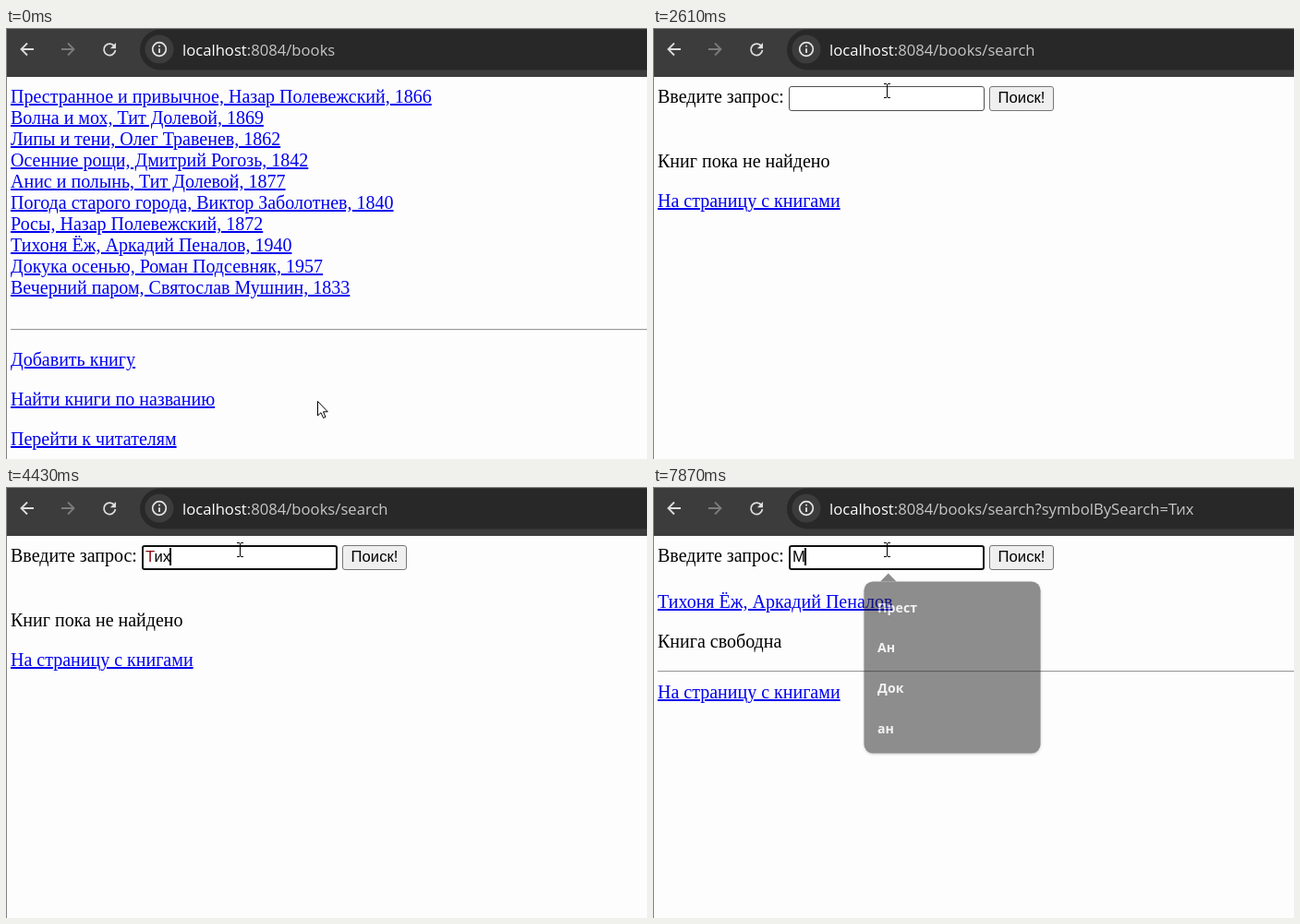
These frames come from a looping animation (694x467 px, 7.99 s). An HTML page:

```html
<!DOCTYPE html>
<html lang="ru">
<head>
<meta charset="utf-8">
<title>Книги</title>
<style>
html, body { margin: 0; width: 100%; height: 100%; overflow: hidden; background: #fdfdfd; }
#stage { position: relative; width: 694px; height: 467px; overflow: hidden; background: #fdfdfd;
  font: 20px/23px "Liberation Serif", "Times New Roman", serif; color: #000; }
#stage div, #stage svg { position: absolute; left: 0; top: 0; white-space: pre; box-sizing: border-box; }
[hidden] { display: none !important; }
#stage .line { left: 5px; }
#stage .link { left: 5px; color: #00e; text-decoration: underline; }
#stage .rule { left: 5px; width: 700px; height: 2px; background: #eee; border-top: 1px solid #9a9a9a; }
#stage #url { left: 191px; top: 12px; font: 16.65px/23px "Open Sans", "Noto Sans", sans-serif; color: #c7c7c7; }
#url b { font-weight: 400; color: #fff; }
.ui { font: 16.67px/25px "Liberation Sans", Arial, sans-serif; }
#stage #field { left: 147px; top: 63px; width: 212px; height: 27px; border: 1px solid #767676; border-radius: 3px; background: #fff; }
#stage #field.hover { border-color: #4f4f4f; }
#stage #field.focus { border: 2px solid #101010; }
#stage #typed { left: 151px; top: 63px; }
#typed.tinted::first-letter { color: #8b0a14; }
#caret { width: 2px; height: 19px; background: #000; }
#stage #button { left: 364px; top: 63px; width: 70px; height: 27px; border: 1px solid #767676; border-radius: 3px;
  background: #efefef; text-align: center; line-height: 24px; }
#stage #popup { left: 226px; top: 100px; width: 196px; height: 191px; border-radius: 10px; background: #1f1f1f;
  box-shadow: 0 1px 3px #0006; font: 700 14.5px/20px "Open Sans", "Noto Sans", sans-serif; color: #e8e8e8; }
#popup::before { content: ""; position: absolute; left: 18px; top: -9px;
  border: 9.5px solid transparent; border-top: 0; border-bottom-color: #1f1f1f; }
#stage #popup div { left: 15px; }
#stage #cursor { overflow: visible; }
</style>
</head>
<body>
<div id="stage">
  <div id="books"></div>
  <div id="search">
    <div class="line" style="top:63px">Введите запрос:</div>
    <div id="field"></div>
    <div id="typed" class="ui"></div>
    <div id="caret"></div>
    <div id="button" class="ui">Поиск!</div>
    <div id="empty"></div>
    <div id="found"></div>
    <div id="popup"></div>
  </div>

  <svg width="694" height="467" fill="none" stroke-width="1.8">
    <path fill="#3c3c3c" d="M0 0H694V53H0Z"/>
    <path fill="#282828" d="M694 1.5H167a22 22 0 0 0 0 44H694Z"/>
    <path stroke="#808080" stroke-width="1" d="M.5 467V.5H694"/>
    <path stroke="#dedede" d="M30 23H16.5M23 16.5 16.5 23 23 29.5"/>
    <path stroke="#7c7c7c" d="M60 23H73.5M67 16.5 73.5 23 67 29.5"/>
    <g id="reload" stroke="#dedede">
      <path d="M117.6 20.2A6.2 6.2 0 1 0 118.4 24"/>
      <path fill="#dedede" stroke="none" d="M119 16V22.2H112.8Z"/>
    </g>
    <path id="stop" stroke="#dedede" d="M107 17.5 118 28.5M118 17.5 107 28.5"/>
    <circle cx="166" cy="23" r="15.5" fill="#3c3c3c"/>
    <circle cx="166" cy="23" r="7.3" stroke="#e6e6e6" stroke-width="1.7"/>
    <path stroke="#e6e6e6" d="M166 22.2V27M166 18.8V20.5"/>
  </svg>
  <div id="url"></div>

  <svg id="cursor" width="1" height="1" fill="#fff" stroke="#000">
    <path id="arrow" d="M.5.5V16L4 12.8 6.6 18.5 9 17.5 6.5 11.8H11.3Z"/>
    <path id="hand" d="M5.5 15.5V2.5a1.5 1.5 0 0 1 3 0V9q2.6-1 3 .8 2.4-.8 2.9 1 2.6-.6 2.6 1.7V17q0 3-2 5v1.5H7.5V22L2 15.5Q.2 13 1.5 12.3t4 3.2Z"/>
    <path id="beam" fill="none" d="M0 .5H3M4 .5H7M3.5 1V15M0 15.5H3M4 15.5H7"/>
  </svg>
</div>

<script>
const $ = id => document.getElementById(id);

function add(parent, top, text, type = "link") {
  const el = document.createElement("div");
  el.className = type;
  el.style.top = top + "px";
  el.textContent = text;
  $(parent).append(el);
  return el;
}

[
  "Престранное и привычное, Назар Полевежский, 1866",
  "Волна и мох, Тит Долевой, 1869",
  "Липы и тени, Олег Травенев, 1862",
  "Осенние рощи, Дмитрий Рогозь, 1842",
  "Анис и полынь, Тит Долевой, 1877",
  "Погода старого города, Виктор Заболотнев, 1840",
  "Росы, Назар Полевежский, 1872",
  "Тихоня Ёж, Аркадий Пеналов, 1940",
  "Докука осенью, Роман Подсевняк, 1957",
  "Вечерний паром, Святослав Мушнин, 1833"
].forEach((book, i) => add("books", 63 + 23 * i, book));
add("books", 326, "", "rule");
add("books", 348, "Добавить книгу");
const searchLink = add("books", 391, "Найти книги по названию");
add("books", 434, "Перейти к читателям");

add("empty", 133, "Книг пока не найдено", "line");
add("empty", 176, "На страницу с книгами");
add("found", 113, "Тихоня Ёж, Аркадий Пеналов");
add("found", 156, "Книга свободна", "line");
add("found", 199, "", "rule");
add("found", 211, "На страницу с книгами");
["Прест", "Ан", "Док", "ан"].forEach((hint, i) => add("popup", 18.5 + 45 * i, hint, "hint"));

// Each entry overrides part of the state from its time on (ms).
const LOOP = 7990;
const timeline = [
  [0, { page: "books", path: "/books", loading: false, pressed: false, field: "", typed: "", caret: 0, popup: 0,
        cursor: "arrow", x: 337, y: 404 }],
  [550, { cursor: "" }],
  [700, { cursor: "arrow", x: 273, y: 412 }],
  [830, { cursor: "hand", x: 215, y: 393 }],
  [980, { x: 209, y: 394 }],
  [1130, { x: 205, y: 397 }],
  [1530, { pressed: true }],
  [1790, { pressed: false, loading: true, cursor: "arrow", x: 211 }],
  [1910, { loading: false, page: "empty", path: "/books/search" }],
  [2340, { x: 213, y: 347 }],
  [2490, { x: 235, y: 190 }],
  [2610, { cursor: "beam", x: 250, y: 60, field: "hover" }],
  [3180, { field: "focus", caret: 151, popup: 1 }],
  [3710, { caret: 0 }],
  [3860, { typed: "Т", caret: 161 }],
  [4000, { popup: .245 }],
  [4150, { popup: 0 }],
  [4430, { typed: "Тих", caret: 177 }],
  [5110, { loading: true, caret: 0 }],
  [5360, { loading: false, page: "found", path: "/books/search?symbolBySearch=Тих", field: "hover", typed: "" }],
  [7010, { field: "focus", caret: 151, popup: 1 }],
  [7440, { caret: 0 }],
  [7730, { typed: "М", caret: 164 }],
  [7870, { popup: .5 }]
];

const show = (id, visible) => $(id).toggleAttribute("hidden", !visible);

function render(time) {
  const s = Object.assign({}, ...timeline.filter(([start]) => start <= time).map(([, change]) => change));

  show("books", s.page === "books");
  show("search", s.page !== "books");
  show("empty", s.page === "empty");
  show("found", s.page === "found");
  show("reload", !s.loading);
  show("stop", s.loading);
  $("url").innerHTML = "<b>localhost</b>:8084" + s.path;
  searchLink.style.color = s.pressed ? "#f00" : "";

  $("field").className = s.field;
  $("typed").textContent = s.typed;
  $("typed").className = s.typed.startsWith("Т") ? "ui tinted" : "ui";
  show("caret", s.caret);
  $("caret").style.left = s.caret + "px";
  $("caret").style.top = (s.typed ? 66 : 67) + "px";

  $("popup").style.opacity = s.popup;
  $("popup").style.transform = `scale(${.95 + .05 * s.popup})`;

  for (const shape of ["arrow", "hand", "beam"]) show(shape, s.cursor === shape);
  $("cursor").style.transform = `translate(${s.x}px, ${s.y}px)`;
}

const begin = performance.now();
function tick() {
  render((performance.now() - begin) % LOOP);
  requestAnimationFrame(tick);
}
tick();
</script>
</body>
</html>
```
